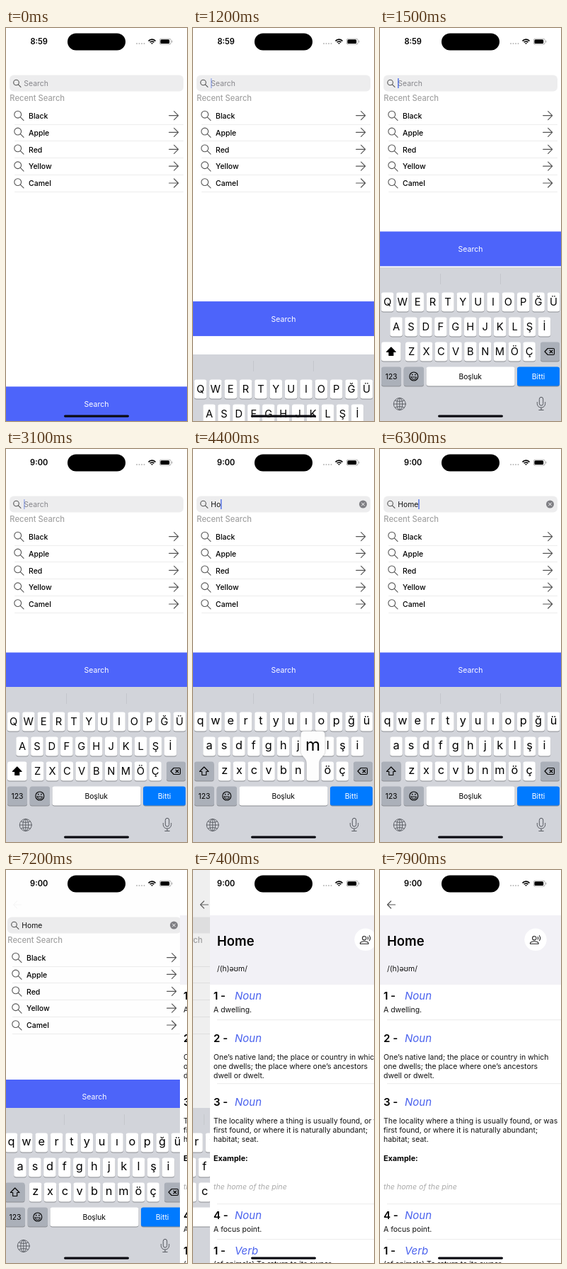
An HTML page with a canvas that plays this animation: 256 px wide and 555 px high, repeating every 8000 ms.

```html
<!DOCTYPE html>
<html lang="en">
<head>
<meta charset="utf-8">
<title>Dictionary search</title>
<style>
html, body { margin: 0; width: 100%; height: 100%; overflow: hidden; background: #fff; }
canvas { display: block; width: 256px; height: 555px; }
</style>
</head>
<body>
<canvas id="stage"></canvas>
<script>
const W = 256, H = 555, LOOP = 8000, STEP = 100;
const KEYBOARD = 219, BLUE = '#4d64fa', GREY_KEY = '#abb0b9', ICON = '#555';
const canvas = document.getElementById('stage');
const c = canvas.getContext('2d');
const dpr = window.devicePixelRatio || 1;
canvas.width = W * dpr;
canvas.height = H * dpr;

// touch-down time of each typed letter, with its key centre
const taps = [
  { at: 3200, ch: 'H', x: 128, y: 420 },
  { at: 3900, ch: 'o', x: 181.4, y: 385 },
  { at: 4400, ch: 'm', x: 169.5, y: 455 },
  { at: 5000, ch: 'e', x: 53.2, y: 385 }
];
// spans in which the caret is hidden; it is half faded at both ends
const caretOff = [[-200, 1300], [2100, 2800], [3100, 3200], [5800, 6300], [6800, 8100]];
const keyRows = [
  { keys: 'qwertyuıopğü', x: 10.5, gap: 21.36, y: 385 },
  { keys: 'asdfghjklşi', x: 23, gap: 20.95, y: 420 },
  { keys: 'zxcvbnmöç', x: 44.7, gap: 20.8, y: 455 }
];
const entries = [
  { y: 177.6, n: 1, kind: 'Noun', lines: ['A dwelling.'], top: 197, rule: 211.5 },
  { y: 237.6, n: 2, kind: 'Noun', top: 264, rule: 301.5, lines: [
    'One’s native land; the place or country in which',
    'one dwells; the place where one’s ancestors', 'dwell or dwelt.'] },
  { y: 327.6, n: 3, kind: 'Noun', top: 354, rule: 471.5, lines: [
    'The locality where a thing is usually found, or was',
    'first found, or where it is naturally abundant;', 'habitat; seat.'] },
  { y: 487.6, n: 4, kind: 'Noun', lines: ['A focus point.'], top: 507, rule: 521.5 },
  { y: 537.6, n: 1, kind: 'Verb', lines: ['(of animals) To return to its owner.'], top: 556 }
];

const clamp = v => Math.max(0, Math.min(1, v));

// critically damped spring from 0 to 1
function spring(t, start) {
  const s = Math.max(0, t - start) * 0.01826;
  return 1 - (1 + s) * Math.exp(-s);
}

const rise = t => 1 - (1 - clamp((t - 1130) / 300)) ** 3;
const push = t => spring(t, 7183);

function rect(x, y, w, h, color) {
  c.fillStyle = color;
  c.fillRect(x, y, w, h);
}

function round(x, y, w, h, r, color) {
  c.beginPath();
  c.roundRect(x, y, w, h, r);
  c.fillStyle = color;
  c.fill();
}

function disc(x, y, r, color) {
  c.beginPath();
  c.arc(x, y, r, 0, 7);
  c.fillStyle = color;
  c.fill();
}

// y is the middle of the capital letters
function text(s, x, y, size, color = '#000', style = '400', align = 'left') {
  c.font = `${style} ${size}px Inter, sans-serif`;
  c.textAlign = align;
  c.fillStyle = color;
  c.fillText(s, x, y + size * 0.364);
}

function stroke(d, x, y, color = ICON, width = 1.1, fill) {
  const path = new Path2D(d);
  c.save();
  c.translate(x, y);
  c.lineCap = c.lineJoin = 'round';
  c.lineWidth = width;
  c.strokeStyle = color;
  if (fill) {
    c.fillStyle = fill;
    c.fill(path);
  }
  c.stroke(path);
  c.restore();
}

function shifted(x, y, paint) {
  c.save();
  c.translate(x, y);
  paint();
  c.restore();
}

function magnifier(x, y, r) {
  const a = r * 0.7, b = r * 1.7;
  stroke(`M${r} 0A${r} ${r} 0 1 1 ${-r} 0A${r} ${r} 0 1 1 ${r} 0M${a} ${a}L${b} ${b}`, x, y);
}

function caretAlpha(t) {
  const span = caretOff.find(([a, b]) => t >= a && t < b);
  if (!span) return 1;
  return t < span[0] + STEP || t >= span[1] - STEP ? 0.5 : 0;
}

function searchPage(t) {
  rect(0, 0, W, H, '#fff');
  round(5, 66.5, 246, 23, 6, '#ededee');
  magnifier(14.5, 77, 3.8);
  const typed = taps.filter(k => t >= k.at + STEP).map(k => k.ch).join('');
  text(typed || 'Search', 25.3, 78, 10.4, typed ? '#111' : '#85858a');
  const end = 25.3 + (typed ? c.measureText(typed).width : 0);
  c.globalAlpha = caretAlpha(t);
  rect(end - 0.1, 71, 1.3, 14, '#3f62e6');
  c.globalAlpha = 1;
  if (typed) {
    disc(240.5, 78, 5.5, '#7e7e83');
    stroke('M-2-2L2 2M2-2L-2 2', 240.5, 78, '#fff', 1);
  }

  text('Recent Search', 5.3, 99.3, 11.2, '#a3a3a3', '500');
  ['Black', 'Apple', 'Red', 'Yellow', 'Camel'].forEach((word, i) => {
    const y = 124 + i * 23.85;
    magnifier(16.7, y - 1.8, 4.9);
    text(word, 32, y, 10.5, '#000', '500');
    stroke('M-6.5 0H6.5M.5-6L6.5 0L.5 6', 237.2, y - 0.4, ICON, 1.2);
    rect(12, Math.round(y + 11.5), 239, 0.6, '#e2e2e2');
  });

  const lift = KEYBOARD * (rise(t) - push(t));
  const press = clamp((t - 6720) / 150) - clamp((t - 6930) / 250);
  c.globalAlpha = 1 - 0.8 * press;
  rect(0, 506.4 - lift, W, 49, BLUE);
  text('Search', 128, 531 - lift, 10.5, '#fff', '400', 'center');
  c.globalAlpha = 1;
}

function key(x, y, w, color = '#fff') {
  round(x, y - 12.5, w, 27, 3.2, '#8b8d92');
  round(x, y - 13.5, w, 27, 3.2, color);
}

function popup({ x, y, ch }) {
  c.save();
  c.translate(x, y);
  c.shadowColor = 'rgba(0,0,0,.3)';
  c.shadowBlur = 3 * dpr;
  c.fillStyle = '#fdfdfd';
  c.fill(new Path2D('M-12-56.5H12Q17-56.5 17-51.5V-29C17-20 8.8-20 8.8-11V10.5' +
    'Q8.8 13.5 5.8 13.5H-5.8Q-8.8 13.5-8.8 10.5V-11C-8.8-20-17-20-17-29V-51.5Q-17-56.5-12-56.5Z'));
  c.restore();
  text(ch, x, y - 38, 24, '#000', '400', 'center');
}

function keyboard(t) {
  const upper = t < 3400;
  rect(0, 336, W, KEYBOARD, '#d2d4da');
  rect(85, 345, 0.7, 15, '#bfc1c6');
  rect(170, 345, 0.7, 15, '#bfc1c6');

  for (const { keys, x, gap, y } of keyRows) {
    [...keys].forEach((ch, i) => {
      const cx = x + i * gap;
      key(cx - 8.75, y, 17.5);
      if (upper) text(ch.toLocaleUpperCase('tr'), cx, y, 14.7, '#000', '400', 'center');
      else text(ch, cx, y - 1.5, 16.3, '#000', '400', 'center');
    });
  }

  key(2, 455, 27.5, upper ? '#fff' : GREY_KEY);
  stroke('M0-6L6.3.5H3V5.5H-3V.5H-6.3Z', 15.7, 455, '#000', 1.1, upper && '#000');
  key(227, 455, 27, GREY_KEY);
  stroke('M-7 0L-2.7-4.5H5Q6.5-4.5 6.5-3V3Q6.5 4.5 5 4.5H-2.7ZM0-2L4 2M4-2L0 2', 240, 455, '#000');

  key(2, 490, 28, GREY_KEY);
  text('123', 16, 490, 10.4, '#000', '400', 'center');
  key(33.7, 490, 28.3, GREY_KEY);
  stroke('M6 0A6 6 0 1 1-6 0A6 6 0 1 1 6 0', 47.8, 490, '#000', 1.1);
  stroke('M-3.7 1H3.7Q3 4.3 0 4.3T-3.7 1Z', 47.8, 490, '#000', 0.9);
  disc(45.7, 487.6, 0.9, '#000');
  disc(49.9, 487.6, 0.9, '#000');
  key(65.5, 490, 125);
  text('Boşluk', 127.7, 490, 10.3, '#000', '400', 'center');
  key(194, 490, 60, '#007aff');
  text('Bitti', 224, 490, 10.4, '#fff', '400', 'center');

  const held = taps.find(k => t >= k.at && t < k.at + 2 * STEP);
  if (held) popup(held);
}

function dock() {
  stroke('M8.5 0A8.5 8.5 0 1 1-8.5 0A8.5 8.5 0 1 1 8.5 0M4 0A4 8.5 0 1 1-4 0A4 8.5 0 1 1 4 0' +
    'M-8.5 0H8.5M0-8.5V8.5M-6.5-5Q0-2 6.5-5M-6.5 5Q0 2 6.5 5', 27.8, 531, '#55585f', 0.9);
  stroke('M-2.7-6.5A2.7 2.7 0 0 1 2.7-6.5V0A2.7 2.7 0 0 1-2.7 0Z' +
    'M-5.7-2V0A5.7 5.7 0 0 0 5.7 0V-2M0 6V9M-3.2 9H3.2', 228, 530.5, '#55585f', 1);
}

function wordPage() {
  rect(0, 0, W, H, '#fff');
  rect(0, 64, W, 98, '#f2f1f6');
  text('Home', 10, 100.2, 18.5, '#000', '600');
  text('/(h)əʊm/', 10, 139, 10.4, '#111');
  disc(220, 98.3, 15.7, '#fff');
  stroke('M1.5-2.5A2.7 2.7 0 1 1-3.9-2.5A2.7 2.7 0 1 1 1.5-2.5M-7 5.5V4.5Q-6 2-1.2 2T4.6 4.5V5.5Z' +
    'M3.7-4Q5-2.5 3.7-.8M5.9-6Q8.4-2.5 5.9 1', 219.5, 98.7, '#222');

  for (const e of entries) {
    text(e.n + ' -', 5, e.y, 15, '#000', '600');
    text(e.kind, 35, e.y, 15, '#4a62ee', 'italic 400');
    e.lines.forEach((line, i) => text(line, 5, e.top + i * 13.3, 10.45, '#111'));
    if (e.rule) rect(10, e.rule, W, 0.6, '#dedede');
  }
  text('Example:', 5, 407, 10.8, '#000', '700');
  text('the home of the pine', 5, 447, 10.65, '#aaa', 'italic 400');
}

function statusBar(t) {
  text(t < 1900 ? '8:59' : '9:00', 46.7, 19.3, 11.1, '#000', '600', 'center');
  round(87, 7.5, 82, 24, 12, '#000');
  for (let i = 0; i < 4; i++) disc(185 + i * 3.5, 22, 1, '#b8b8b8');
  c.lineWidth = 1.7;
  c.lineCap = 'butt';
  c.strokeStyle = '#000';
  for (const r of [1.2, 4, 6.8]) {
    c.beginPath();
    c.arc(206.5, 23, r, -Math.PI * 0.76, -Math.PI * 0.24);
    c.stroke();
  }
  round(217, 14.8, 16.5, 8.6, 2.7, '#a5a5a5');
  round(217.7, 15.5, 15.1, 7.2, 2.1, '#fff');
  round(218.4, 16.2, 12.8, 5.8, 1.5, '#000');
  round(234.2, 17.6, 1.1, 3, 0.5, '#a5a5a5');
}

function draw(t) {
  const p = push(t);
  const back = -0.3 * W * p;
  c.setTransform(dpr, 0, 0, dpr, 0, 0);

  shifted(back, 0, () => searchPage(t));
  rect(0, 0, W, H, `rgba(0,0,0,${0.07 * p})`);
  shifted(back, Math.round(KEYBOARD * (1 - spring(t, 1120))), () => keyboard(t));
  shifted(back, KEYBOARD * (1 - rise(t)), dock);

  if (p > 0) {
    shifted(Math.round(W * (1 - p)), 0, wordPage);
    c.globalAlpha = p;
    stroke('M5.5 0H-5.5M-.5-5L-5.5 0L-.5 5', 16, 49, ICON, 1.2);
    c.globalAlpha = 1;
  }

  statusBar(t);
  round(82, 546.5, 92, 3.2, 1.6, '#0c0c12');
}

// the motion advances ten times a second
const begin = performance.now();
function tick() {
  const t = (performance.now() - begin) % LOOP;
  draw(Math.floor((t + 15) / STEP) * STEP % LOOP);
  requestAnimationFrame(tick);
}
tick();
</script>
</body>
</html>
```
